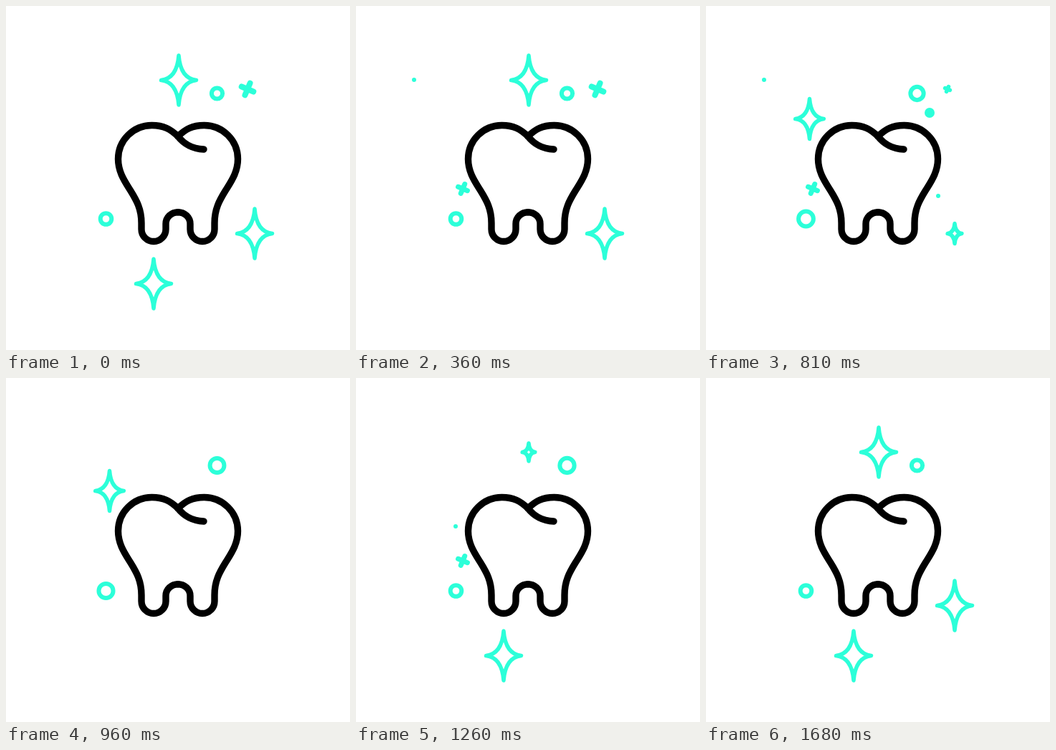
An HTML page with a canvas that plays this animation: 480x480 px, repeating every 1800 ms.

```html
<!DOCTYPE html>
<html lang="en">
<head>
<meta charset="utf-8">
<title>Sparkling tooth</title>
<style>
  html, body { margin: 0; height: 100%; overflow: hidden; background: #fff; }
  canvas { display: block; width: 480px; height: 480px; }
</style>
</head>
<body>
<canvas id="stage" width="480" height="480"></canvas>
<script>
const ctx = document.getElementById('stage').getContext('2d');
const LOOP = 1800, STEP = 30, MINT = '#2cffd9';
const CENTER = 240;
let t = 0;

const clamp = x => Math.min(1, Math.max(0, x));

// Timing: quick ease-out growth, accelerating collapse, slow swell and return
const grow = start => 1 - (1 - clamp((t - start) / 150)) ** 2;
const shrink = start => 1 - clamp((t - start) / 120) ** 1.8;
const swell = (start, length) => Math.sin(Math.PI * clamp((t - start) / length));
const during = (from, to) => t >= from && t < to;

function star(x, y, scale) {
  if (scale <= 0) return;
  ctx.lineWidth = 5.5;
  ctx.beginPath();
  // Four concave sides, each turning a quarter around the middle
  for (let i = 0; i <= 4; i++) {
    const angle = i * Math.PI / 2, mid = angle - Math.PI / 4;
    const tipX = x + 24.5 * scale * Math.sin(angle), tipY = y - 34.5 * scale * Math.cos(angle);
    const pull = 3.5 * scale;
    if (i === 0) ctx.moveTo(tipX, tipY);
    else ctx.quadraticCurveTo(x + pull * Math.sin(mid), y - pull * Math.cos(mid), tipX, tipY);
  }
  ctx.closePath();
  ctx.stroke();
}

function ring(x, y, r) {
  ctx.lineWidth = 6;
  ctx.beginPath();
  ctx.arc(x, y, r, 0, 2 * Math.PI);
  ctx.stroke();
}

function dot(x, y, r) {
  ctx.beginPath();
  ctx.arc(x, y, r, 0, 2 * Math.PI);
  ctx.fill();
}

function speck(x, y, start, life = 90) {
  if (during(start, start + life)) dot(x, y, 3);
}

function cross(x, y, size, width) {
  if (size <= 0) return;
  const a = size * Math.cos(0.4), b = size * Math.sin(0.4);
  ctx.lineWidth = width;
  ctx.beginPath();
  ctx.moveTo(x - a, y - b);
  ctx.lineTo(x + a, y + b);
  ctx.moveTo(x + b, y - a);
  ctx.lineTo(x - b, y + a);
  ctx.stroke();
}

// One half of the tooth: crown, side, leg and half of the arch; the other is its mirror
const half = new Path2D(`
  M0 182 C10 172 20 166.5 36.5 166.5 A47 47 0 0 1 83.5 213.5
  C83.5 232 74 245 66 258 C58 271 51 283 51 303
  V311.5 A17 17 0 0 1 17 311.5 V304 A17 16.3 0 0 0 0 287.7`);
const groove = new Path2D('M0 182 C8 192 18 199 36 200');

function tooth() {
  ctx.strokeStyle = '#000';
  ctx.lineWidth = 9.4;
  for (const side of [-1, 1]) {
    ctx.save();
    ctx.translate(CENTER, 0);
    ctx.scale(side, 1);
    ctx.stroke(half);
    if (side > 0) ctx.stroke(groove);
    ctx.restore();
  }
}

function draw() {
  ctx.fillStyle = '#fff';
  ctx.fillRect(0, 0, 480, 480);
  ctx.lineCap = ctx.lineJoin = 'round';
  ctx.strokeStyle = ctx.fillStyle = MINT;

  star(206, 387.5, Math.max(shrink(0), grow(1080)));
  star(241, 103.5, Math.max(shrink(600), grow(1230)));
  star(347, 317.5, Math.max(shrink(720), grow(1380)));
  star(144.5, 157.5, 0.81 * grow(600) * shrink(1038));

  ring(294.5, 122, 7.6 + 2.7 * swell(600, 1080));
  ring(139.5, 297, 7.8 + 2.6 * swell(360, 900));

  const fade = shrink(720);
  cross(337, 116, 9 * fade, 4 + 4 * fade);
  if (during(60, 900) || during(1200, 1500)) cross(149, 255, 7, 7);
  if (during(390, 960)) dot(312, 149, 7);

  speck(352, 123, 30);
  speck(345, 333, 390);
  speck(81, 103, 360, 540);
  speck(324, 265, 780);
  speck(46, 218, 1050);
  speck(127, 80, 1050, 120);
  speck(139, 207, 1230);

  tooth();
}

function tick() {
  t = Math.floor(performance.now() % LOOP / STEP) * STEP;
  draw();
  requestAnimationFrame(tick);
}
tick();
</script>
</body>
</html>
```
